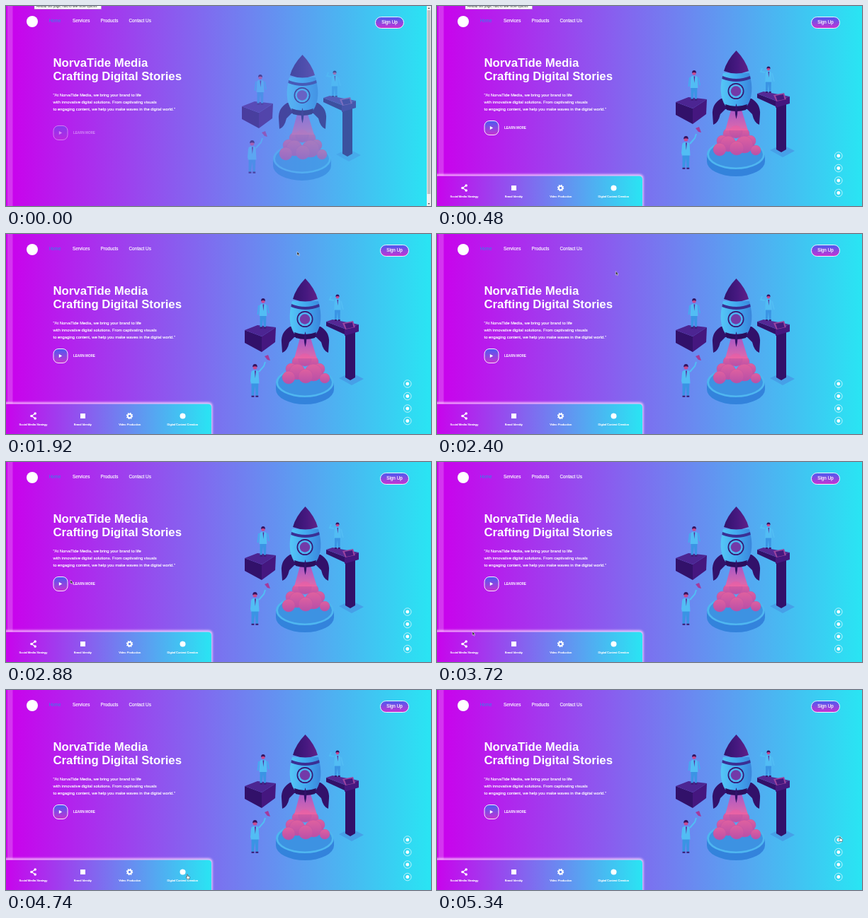
Write an HTML page that moves like this. It is 600x283 px and loops after 5.4 s.

```html
<!DOCTYPE html>
<html lang="en">
<head>
<meta charset="utf-8">
<title>Landing page</title>
<style>
  html, body { margin: 0; width: 100%; height: 100%; overflow: hidden; background: #7a72ef; }
  svg { display: block; width: 600px; height: 283px; }
  text { font-family: "Liberation Sans", Arial, sans-serif; fill: #fff; }
  .nav { font-size: 6.35px; stroke: #fff; stroke-width: .15; }
  .title { font-size: 16.75px; font-weight: bold; }
  .body { font-size: 5.86px; stroke: #fff; stroke-width: .15; }
  .more { font-size: 4.6px; font-weight: bold; }
  .label { font-size: 4.1px; text-anchor: middle; stroke: #fff; stroke-width: .18; }
  .tip { font-size: 4.5px; fill: #333; }
</style>
</head>
<body>
<svg viewBox="0 0 600 283" xmlns="http://www.w3.org/2000/svg">
  <defs>
    <linearGradient id="sky"><stop stop-color="#cb00ec"/><stop offset="1" stop-color="#29e5f3"/></linearGradient>
    <linearGradient id="btn" x2="0" y2="1"><stop stop-color="#4a5cf0"/><stop offset="1" stop-color="#c832d2"/></linearGradient>
    <linearGradient id="nose"><stop stop-color="#32126c"/><stop offset=".5" stop-color="#45187f"/><stop offset="1" stop-color="#5f2088"/></linearGradient>
    <linearGradient id="hull"><stop stop-color="#55c6f6"/><stop offset=".5" stop-color="#43aaf0"/><stop offset="1" stop-color="#3a86dc"/></linearGradient>
    <linearGradient id="fire" x2="0" y2="1"><stop stop-color="#b04fc0"/><stop offset="1" stop-color="#ee64a4"/></linearGradient>
    <linearGradient id="puff" x2="0" y2="1"><stop stop-color="#e0609f"/><stop offset="1" stop-color="#b850a8"/></linearGradient>
    <filter id="glow" x="-10%" y="-30%" width="120%" height="160%"><feGaussianBlur stdDeviation="1.500"/></filter>
    <g id="man">
      <path d="M-4.500 18h9l-.5 19h-3l-1-13-1.500 13h-3z" fill="#3a94e4"/>
      <path d="M-4.500 5Q0 2.500 4.500 5l1 16h-11z" fill="#52bdf4"/>
      <path d="M-.5 4.500L.3 14 1.300 4.500z" fill="#5a2796"/>
      <path d="M-4.500 38.500v-2h3.500v2zM.8 38.500v-2h3.500v2z" fill="#38186f"/>
      <circle r="2.700" fill="#c94a90"/>
      <path d="M-3-.2Q-3-4 0-4T3-.2Q0-2-3-.2z" fill="#35125f"/>
    </g>
    <g id="ring"><circle r="5.300" fill="none" stroke="#fff" stroke-width=".65"/><circle r="2.400" fill="#fff"/></g>
  </defs>

  <rect width="600" height="283" fill="url(#sky)"/>
  <rect x="2" width="7.500" height="283" fill="#fff" opacity=".2"/>

  <circle cx="37" cy="22" r="8" fill="#fff"/>
  <g class="nav">
    <text x="60.500" y="22.500" style="fill:#2f86e6;stroke:none">Home</text>
    <text x="94" y="22.500">Services</text>
    <text x="133.500" y="22.500">Products</text>
    <text x="173.500" y="22.500">Contact Us</text>
  </g>
  <g id="sign">
    <rect x="528.500" y="15.500" width="40" height="16" rx="8" fill="url(#btn)" stroke="#fff" stroke-width=".9"/>
    <text class="nav" x="548.500" y="25.400" text-anchor="middle">Sign Up</text>
  </g>

  <g class="title">
    <text x="66.500" y="85.800">NorvaTide Media</text>
    <text x="66.500" y="105.200">Crafting Digital Stories</text>
  </g>
  <g class="body">
    <text x="66.500" y="128.200">"At NorvaTide Media, we bring your brand to life</text>
    <text x="66.500" y="137.900">with innovative digital solutions. From captivating visuals</text>
    <text x="66.500" y="147.600">to engaging content, we help you make waves in the digital world."</text>
  </g>
  <g id="more">
    <rect x="67" y="162.500" width="20" height="20" rx="7" fill="url(#btn)" stroke="#fff" stroke-width=".9"/>
    <path d="M74.800 170l4.400 2.500-4.400 2.500z" fill="#fff"/>
    <text class="more" x="95" y="174">LEARN MORE</text>
  </g>

  <g id="art">
    <!-- launch pad -->
    <path d="M381 210v10a41 21 0 0 0 82 0v-10z" fill="#3383dc"/>
    <ellipse cx="422" cy="210" rx="41" ry="21" fill="#4fb6f0"/>
    <ellipse cx="422" cy="210" rx="38" ry="18.500" fill="#3d92e2"/>
    <g id="smoke" fill="url(#puff)"></g>
    <path d="M415 147h15l9 29h-32z" fill="url(#fire)" opacity=".9"/>
    <!-- rocket -->
    <path d="M401 131Q388 139 389 153L390 168Q397 166 400 153L407 146h31L445 153Q448 166 455 168L456 153Q457 139 444 131z" fill="#32116a"/>
    <path d="M404 95Q396 124 407 141q15 6 31 0Q449 124 441 95z" fill="url(#hull)"/>
    <path d="M422.500 63Q409 77 405 92q17.500 7 35 0Q436 77 422.500 63z" fill="url(#nose)"/>
    <path d="M403 99q19.500 8 39 0l.7 4q-20 8-40.400 0z" fill="#3a2f94"/>
    <path d="M407 139q15 6 31 0l-2 8q-13 4-27 0z" fill="#2b0e5e"/>
    <circle cx="422" cy="120.500" r="11.500" fill="#361672"/>
    <circle cx="422" cy="120.500" r="9.800" fill="#4eb6f2"/>
    <circle cx="422" cy="120.500" r="7.200" fill="#733aa8"/>
    <path d="M422.500 138q3.500 10 0 22-3.500-12 0-22z" fill="#32116a"/>
    <!-- left block -->
    <path d="M337 136l24 9v22l-24-13z" fill="#32116a"/>
    <path d="M361 145l20-13-1 21-19 14z" fill="#45177f"/>
    <path d="M337 136l18-7 26 3-20 13z" fill="#4c2592"/>
    <use href="#man" x="363" y="95"/>
    <path d="M357 101l-1.500 13M369 101l2 11" stroke="#45aaf0" stroke-width="2"/>
    <!-- right tower -->
    <path d="M470 204l17-8 18 9-17 9z" fill="#46a0e8"/>
    <path d="M479 138h14v65l-7 4-7-4z" fill="#32116a"/>
    <path d="M452 124l26 10v8l-26-12z" fill="#32116a"/>
    <path d="M478 134l20-6v10l-20 6z" fill="#45177f"/>
    <path d="M452 124l9-3 37 7-20 6z" fill="#552894"/>
    <path d="M475 126l15-3 3 9-14 3z" fill="#9a449f"/>
    <path d="M478 127l11-2 1.500 7-10 2z" fill="#45197f"/>
    <use href="#man" transform="translate(468 89) scale(.88)"/>
    <path d="M463 94l-6-1 2-5M473 95l3 12" fill="none" stroke="#52bdf4" stroke-width="1.900"/>
    <!-- front helper -->
    <use href="#man" transform="translate(351.500 188.500) scale(1.100)"/>
    <path d="M357 195l7-8 2-6M347 196l-1 13" fill="none" stroke="#52bdf4" stroke-width="2"/>
    <path d="M365 173l5-2 3 8-4-1z" fill="#a43a9c"/>
  </g>

  <g id="social">
    <use href="#ring" x="566.800" y="212"/>
    <use href="#ring" x="566.800" y="229.500"/>
    <use href="#ring" x="566.800" y="247"/>
    <use href="#ring" x="566.800" y="264.500"/>
  </g>

  <g id="panel">
    <path d="M-5 239H285.500q5 0 5 5v45H-5z" fill="#ffd9ff" stroke="#ffd9ff" stroke-width="2" opacity=".8" filter="url(#glow)"/>
    <path d="M-5 240.500H285q5 0 5 5v45H-5z" fill="url(#sky)"/>
    <g fill="#fff">
      <path d="M41.200 254l-5 3.500 5 3.500" fill="none" stroke="#fff" stroke-width="1.200"/>
      <circle cx="41.200" cy="254" r="1.800"/><circle cx="36" cy="257.500" r="1.800"/><circle cx="41.200" cy="261" r="1.800"/>
      <rect x="105" y="254" width="7" height="7"/>
      <circle cx="174.500" cy="257.500" r="2.700" fill="none" stroke="#fff" stroke-width="2"/>
      <circle cx="174.500" cy="257.500" r="4" fill="none" stroke="#fff" stroke-width="1.400" stroke-dasharray="1.571"/>
      <circle cx="249.500" cy="257.500" r="4"/>
    </g>
    <g class="label">
      <text x="38.500" y="271.400">Social Media Strategy</text>
      <text x="108.300" y="271.400">Brand Identity</text>
      <text x="174.700" y="271.400">Video Production</text>
      <text x="249.300" y="271.400">Digital Content Creation</text>
    </g>
  </g>

  <g id="tip">
    <rect x="40" y="-5" width="94.500" height="9.400" fill="#fff" stroke="#999" stroke-width=".4"/>
    <text class="tip" x="43" y="1.700">Reload this page, hold to see more options</text>
  </g>
  <g id="bar">
    <rect x="594" width="6" height="283" fill="#eef0f2"/>
    <rect x="594.800" y="6" width="4.400" height="260" fill="#bfc1c4"/>
    <path d="M595.500 4l1.500-2 1.500 2zM595.500 279l1.500 2 1.500-2z" fill="#555"/>
  </g>
  <g id="cursor" stroke="#fff" stroke-width=".5" fill="#222">
    <path id="arrow" d="M0 0v5.200l1.300-1.100 1 2 .9-.4-.9-2h1.600z"/>
    <path id="hand" d="M-.7 0q.7-.8 1.300 0v2.200l2.400.7q.7.300.5 1.300L3 6.500H-.2L-2 4q.3-.8 1.300 0z" fill="#fff" stroke="#222"/>
  </g>
</svg>
<script>
const LOOP = 5400, SCROLLBAR_END = 240, TIP_END = 900, CURSOR_START = 1260;
const $ = id => document.getElementById(id);
const clamp = v => Math.min(1, Math.max(0, v));
const easeOut = p => 1 - (1 - p) ** 3;

// id, start, duration, first opacity, rise
const reveals = [
  ['art', 0, 420, .6, 6],
  ['more', 0, 420, .45, 7],
  ['social', 60, 400, 0, 10],
  ['panel', 60, 400, 0, 15]
];
const barShift = { art: -4, social: -6 };

// time, x, y
const route = [
  [1260, 330, 8], [1600, 385, 18], [1920, 411, 25], [2250, 310, 25], [2600, 165, 95],
  [2880, 91, 167], [3240, 84, 172], [3720, 50, 240], [3960, 39, 257], [4220, 108, 258],
  [4480, 175, 258], [4740, 256, 261], [5040, 567, 264], [5340, 569, 208]
];

const puffs = [
  [412, 181, 8], [433, 181, 8], [422, 178, 9], [403, 191, 8], [442, 191, 8],
  [411, 195, 11], [434, 196, 12], [450, 204, 7], [423, 201, 10], [399, 203, 9]
];
$('smoke').innerHTML = puffs.map(([x, y, r]) =>
  `<circle cx="${x}" cy="${y}" r="${r}" stroke="#c053a4" stroke-width=".5"/>`).join('');

const show = (id, on) => $(id).style.display = on ? '' : 'none';
const move = (id, x, y) => $(id).setAttribute('transform', `translate(${x} ${y})`);

function pointAt(t) {
  const next = route.findIndex(p => p[0] >= t);
  const b = next < 0 ? route.at(-1) : route[next];
  const a = next > 0 ? route[next - 1] : b;
  const p = clamp((t - a[0]) / (b[0] - a[0] || 1));
  const e = p * p * (3 - 2 * p);
  return [a[1] + (b[1] - a[1]) * e, a[2] + (b[2] - a[2]) * e];
}

function draw(t) {
  const bar = t < SCROLLBAR_END;
  for (const [id, start, dur, alpha, rise] of reveals) {
    const e = easeOut(clamp((t - start) / dur));
    $(id).style.opacity = alpha + (1 - alpha) * e;
    move(id, bar ? barShift[id] || 0 : 0, rise * (1 - e));
  }
  move('sign', bar ? -7 : 0, 0);
  show('bar', bar);
  show('tip', t < TIP_END);

  const [x, y] = pointAt(t);
  const overIcon = y > 250 && x < 291 || x > 560 || x > 66 && x < 88 && y > 160 && y < 184;
  show('cursor', t >= CURSOR_START);
  show('arrow', !overIcon);
  show('hand', overIcon);
  move('cursor', x, y);
}

const begin = performance.now();
function tick() {
  draw((performance.now() - begin) % LOOP);
  requestAnimationFrame(tick);
}
draw(0);
requestAnimationFrame(tick);
</script>
</body>
</html>
```
